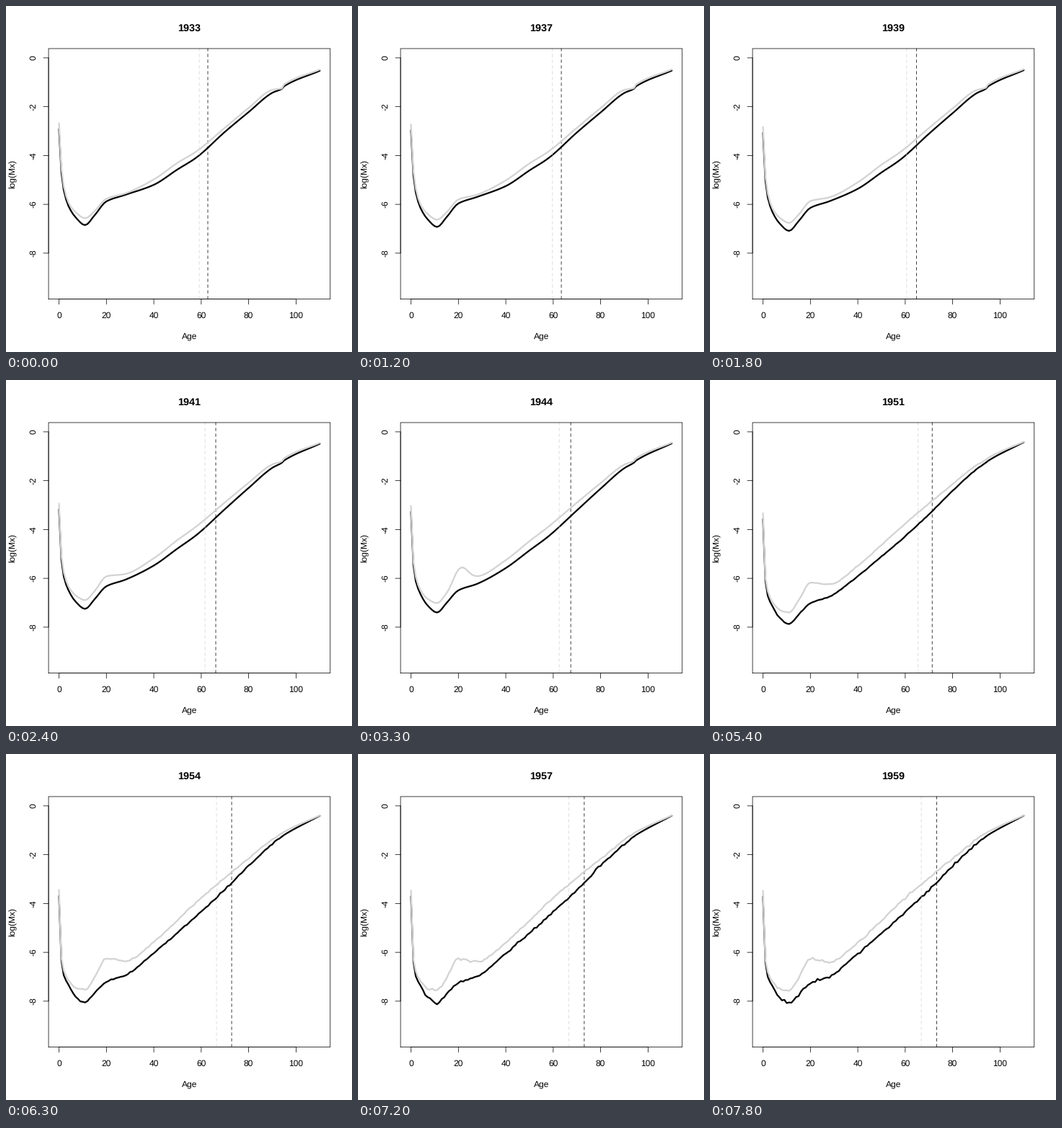
A matplotlib script for the animation above (8 s loop, 480 by 480 pixels).

```python
import numpy as np
import matplotlib.pyplot as plt
from matplotlib.animation import FuncAnimation

plt.rcParams.update({"font.family": "Liberation Sans", "font.size": 12,
                     "axes.unicode_minus": False, "text.hinting": "none"})

SIZE, DPI = 480, 72
LINE = 14.4                      # height of one margin line
LEFT, TOP = 4.1 * LINE, 4.1 * LINE
RIGHT, BOTTOM = SIZE - 2.1 * LINE, SIZE - 5.1 * LINE
LIGHT = "lightgray"
THIN, THICK = 0.75, 2.25
FIRST_YEAR, FRAMES_PER_YEAR = 1933, 3
ALL_AGES = np.arange(111)

# Each curve moves from its first to its last shape, given at a few ages.
KEY_AGES = np.array([0, 1, 2, 4, 7, 11, 15, 20, 28, 40, 50, 58, 70, 80,
                     90, 94, 95, 110])
WOMEN = dict(
    first=[-2.92, -4.7, -5.42, -6.07, -6.53, -6.85, -6.45, -5.88, -5.61, -5.2,
           -4.57, -4.08, -3.03, -2.22, -1.43, -1.27, -1.16, -.53],
    last=[-3.72, -6.4, -7.0, -7.38, -7.85, -8.1, -7.72, -7.27, -7.0, -6.06,
          -5.22, -4.53, -3.45, -2.46, -1.56, -1.26, -1.19, -.4],
    life=(62.78, 73.25), war=0, seed=1)
MEN = dict(
    first=[-2.68, -4.5, -5.25, -5.93, -6.32, -6.57, -6.28, -5.77, -5.55, -4.98,
           -4.3, -3.83, -2.86, -2.05, -1.31, -1.25, -1.09, -.48],
    last=[-3.48, -6.3, -6.8, -7.2, -7.5, -7.58, -7.05, -6.27, -6.4, -5.6,
          -4.7, -3.95, -2.95, -2.16, -1.38, -1.12, -1.06, -.39],
    life=(59.17, 66.75), war=0.42, seed=2)


def px(age):
    return LEFT + (np.asarray(age) + 4.4) / 118.8 * (RIGHT - LEFT)


def py(value):
    return TOP + (0.38 - np.asarray(value)) / 10.26 * (BOTTOM - TOP)


def progress(year):
    return np.interp(year, [1933, 1937, 1941, 1944, 1948, 1954, 1959],
                     [0, 0.06, 0.32, 0.44, 0.68, 0.96, 1])


def bell(x, centre, width):
    return np.exp(-((x - centre) / width) ** 2)


def mix(first, last, t):
    return np.asarray(first) * (1 - t) + np.asarray(last) * t


def monotone_cubic(x, y, at):
    """Shape-preserving Hermite interpolation."""
    step = np.diff(x)
    slope = np.diff(y) / step
    a, b = slope[:-1], slope[1:]
    same = a * b > 0
    inner = np.where(same, 2 * a * b / np.where(same, a + b, 1), 0)
    m = np.concatenate([slope[:1], inner, slope[-1:]])
    i = np.clip(np.searchsorted(x, at, side="right") - 1, 0, len(x) - 2)
    t, h = (at - x[i]) / step[i], step[i]
    return (y[i] * (1 + 2 * t) * (1 - t) ** 2 + y[i + 1] * t * t * (3 - 2 * t)
            + h * m[i] * t * (1 - t) ** 2 + h * m[i + 1] * t * t * (t - 1))


def mortality(group, year):
    knots = mix(group["first"], group["last"], progress(year))
    curve = monotone_cubic(KEY_AGES, knots, ALL_AGES)
    curve += group["war"] * bell(year, 1944, 1.6) * bell(ALL_AGES, 21.5, 3.5)
    # Later years are more ragged, except at the smooth oldest ages.
    rng = np.random.default_rng([group["seed"], year])
    roughness = 0.025 * np.clip((year - 1948) / 11, 0, 1)
    ragged = (ALL_AGES > 4) & (ALL_AGES < 94)
    return curve + roughness * ragged * rng.normal(size=ALL_AGES.size)


fig = plt.figure(figsize=(SIZE / DPI, SIZE / DPI), dpi=DPI, facecolor="white")
ax = fig.add_axes([0, 0, 1, 1])
ax.set(xlim=(0, SIZE), ylim=(SIZE, 0))
ax.axis("off")


def stroke(xs, ys, color="black", width=THIN, **style):
    return ax.plot(xs, ys, color=color, lw=width, snap=False,
                   solid_capstyle="round", solid_joinstyle="round",
                   dash_capstyle="round", **style)[0]


def label(x, y, text, rotation=0, **style):
    return ax.text(x, y, text, ha="center", va="baseline", rotation=rotation,
                   rotation_mode="anchor", **style)


def dashed(color):
    return stroke([0, 0], [BOTTOM, TOP], color,
                  linestyle=(0, (4 / THIN, 4 / THIN)))


curves = [(group, stroke([], [], color, THICK), dashed(color))
          for group, color in ((WOMEN, "black"), (MEN, LIGHT))]

stroke([LEFT, RIGHT, RIGHT, LEFT, LEFT], [BOTTOM, BOTTOM, TOP, TOP, BOTTOM])
stroke(px([0, 100]), [BOTTOM, BOTTOM])
stroke([LEFT, LEFT], py([-8, 0]))
for age in range(0, 101, 20):
    stroke([px(age)] * 2, [BOTTOM, BOTTOM + LINE / 2])
    label(px(age), BOTTOM + 1.8 * LINE, str(age))
for value in range(-8, 1, 2):
    stroke([LEFT, LEFT - LINE / 2], [py(value)] * 2)
    label(LEFT - 1.2 * LINE, py(value), str(value), 90)
label((LEFT + RIGHT) / 2, BOTTOM + 3.8 * LINE, "Age")
label(LEFT - 3.2 * LINE, (TOP + BOTTOM) / 2, "log(Mx)", 90)
title = label((LEFT + RIGHT) / 2, 34.7, "", fontsize=14.4, fontweight="bold")


def draw(frame):
    year = FIRST_YEAR + frame // FRAMES_PER_YEAR
    title.set_text(str(year))
    for group, line, life_mark in curves:
        line.set_data(px(ALL_AGES), py(mortality(group, year)))
        life_mark.set_xdata([px(mix(*group["life"], progress(year)))] * 2)


anim = FuncAnimation(fig, draw, frames=80, interval=100, repeat=True,
                     repeat_delay=0, blit=False)
plt.show()
```
